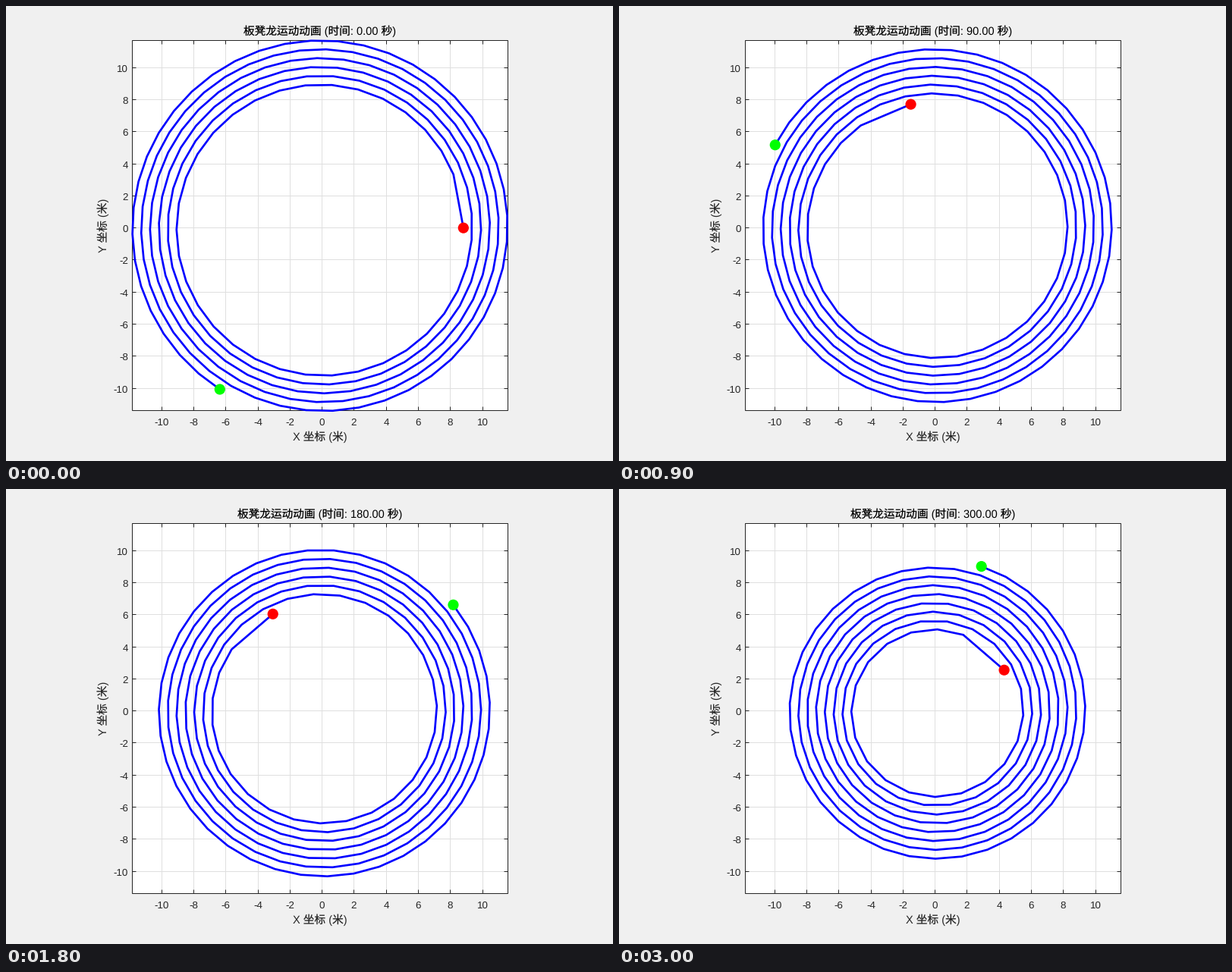
A matplotlib script that plays this animation: 800 px wide and 600 px high, repeating every 3.1 s.

```python
import numpy as np
import matplotlib.pyplot as plt
from matplotlib.animation import FuncAnimation
from matplotlib.patches import Circle, Rectangle

W, H, DPI = 800, 600, 100
FRAMES, INTERVAL = 31, 100
SECONDS_PER_FRAME = 10

# Spiral r = B * theta; the head walks inwards at constant speed
B = 0.55 / (2 * np.pi)
START = 16 * 2 * np.pi
SPEED = 1.0
GAPS = [3.41] + [1.65] * 221

LEFT, RIGHT, TOP, BOTTOM = 166.5, 661.5, 45.5, 533.5
PLOT_CENTER = (413.6, 289.75)
PLOT_HEIGHT = BOTTOM - TOP
INK = "#262626"

plt.rcParams["font.family"] = ["Liberation Sans", "Noto Sans CJK JP"]
plt.rcParams["font.weight"] = "light"
plt.rcParams["text.hinting"] = "none"


def pt(px):
    return px * 72 / DPI


def head_angle(seconds):
    """Angle of the head after stepping one second at a time."""
    theta = START
    for _ in range(seconds):
        theta -= SPEED / (B * theta)
    return theta


def chain(seconds):
    """Positions of all joints, head first, in metres."""
    angles = [head_angle(seconds)]
    for gap in GAPS:
        angles.append(angles[-1] + gap / (B * angles[-1]))
    theta = np.array(angles)
    return B * theta * np.cos(theta), B * theta * np.sin(theta)


# The view fits the chain tightly at the start
x_start, y_start = chain(0)
SCALE = PLOT_HEIGHT / np.ptp(y_start)
X_MID = (x_start.min() + x_start.max()) / 2
Y_MID = (y_start.min() + y_start.max()) / 2


def to_px(x, y):
    return (PLOT_CENTER[0] + (x - X_MID) * SCALE,
            PLOT_CENTER[1] - (y - Y_MID) * SCALE)


fig = plt.figure(figsize=(W / DPI, H / DPI), dpi=DPI, facecolor="#f0f0f0")
ax = fig.add_axes([0, 0, 1, 1])
ax.set_xlim(0, W)
ax.set_ylim(H, 0)
ax.axis("off")


def segment(x, y, color, z):
    ax.plot(x, y, color=color, lw=pt(1), zorder=z, solid_capstyle="butt",
            snap=False)


def label(x, y, text, size, ha="center", color=INK, **kw):
    return ax.text(x, y, text, fontsize=pt(size), ha=ha, va="baseline",
                   color=color, rotation_mode="anchor", **kw)


def dot(color):
    return ax.add_patch(Circle((0, 0), 7.1, facecolor=color, lw=0, zorder=5))


ax.add_patch(Rectangle((LEFT, TOP), RIGHT - LEFT, BOTTOM - TOP, snap=False,
                       facecolor="white", edgecolor=INK, lw=pt(1), zorder=1))

TICK = 5
for value in range(-10, 11, 2):
    px, py = (np.floor(p) + 0.5 for p in to_px(value, value))
    segment([px, px], [TOP + 0.5, BOTTOM - 0.5], "#dfdfdf", 2)
    segment([LEFT + 0.5, RIGHT - 0.5], [py, py], "#dfdfdf", 2)
    for edge, step in ((TOP, TICK), (BOTTOM, -TICK)):
        segment([px, px], [edge, edge + step], INK, 3)
    for edge, step in ((LEFT, TICK), (RIGHT, -TICK)):
        segment([edge, edge + step], [py, py], INK, 3)
    label(px - 0.5, 553.2, str(value), 13.33)
    label(161, py + 5.8, str(value), 13.33, ha="right")

label(414, 573.3, "X 坐标 (米)", 14.67)
label(132.6, 289, "Y 坐标 (米)", 14.67, rotation=90)
title = label(414, 38.3, "", 14.67, color="black")

body, = ax.plot([], [], color="blue", lw=pt(2.67), zorder=4, snap=False,
                solid_joinstyle="round")
head, tail = dot("red"), dot("lime")


def draw(frame):
    seconds = frame * SECONDS_PER_FRAME
    x, y = to_px(*chain(seconds))
    body.set_data(x, y)
    head.center = x[0], y[0]
    tail.center = x[-1], y[-1]
    title.set_text(f"板凳龙运动动画 (时间: {seconds:.2f} 秒)")
    return body, head, tail, title


anim = FuncAnimation(fig, draw, frames=FRAMES, interval=INTERVAL,
                     repeat=True, repeat_delay=0, blit=False)
plt.show()
```
